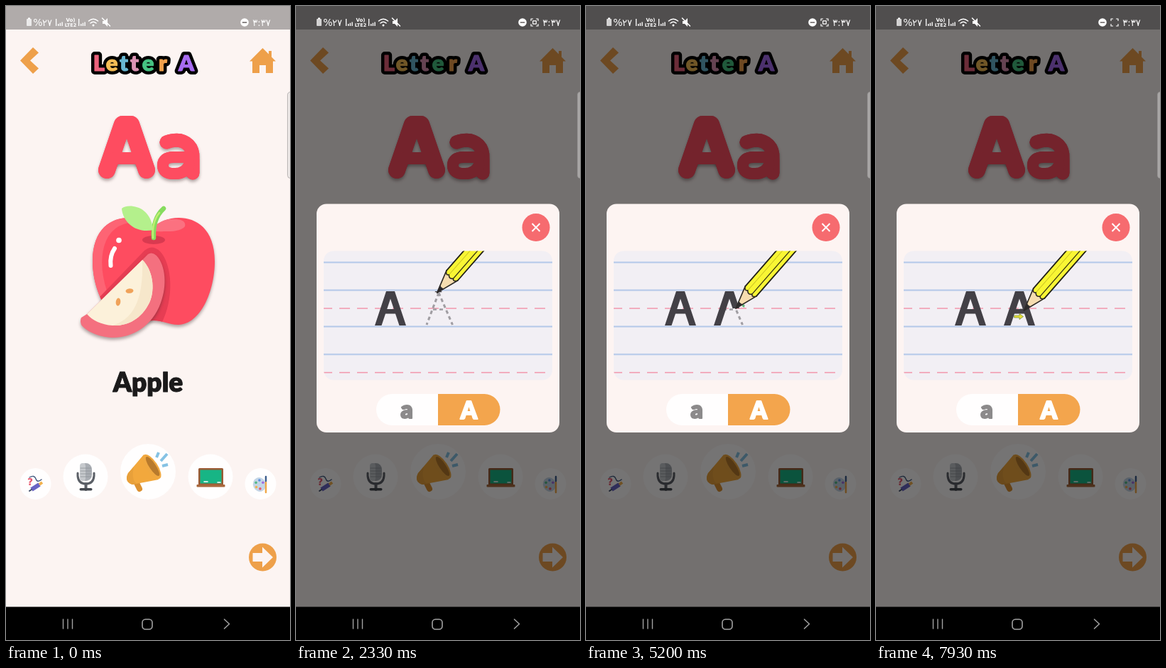
These frames come from a looping animation (400 px wide and 889 px high, 8 s). An HTML page with a canvas:

```html
<!DOCTYPE html>
<html lang="en">
<head>
<meta charset="utf-8">
<title>Letter A</title>
<style>
html, body { margin: 0; width: 100%; height: 100%; overflow: hidden; background: #000; }
canvas { position: absolute; left: 0; top: 0; width: 100vw; height: 100vh; }
</style>
</head>
<body>
<canvas id="stage"></canvas>
<script>
const W = 400, H = 889, LOOP = 8000;
const ORANGE = '#eea04a', RED = '#fe4c60', PAGE = '#fcf4f2', INK = '#434046';
const scale = Math.max(1, window.devicePixelRatio || 1);

function setup(canvas) {
  canvas.width = W * scale;
  canvas.height = H * scale;
  const ctx = canvas.getContext('2d');
  ctx.scale(scale, scale);
  ctx.lineJoin = ctx.lineCap = 'round';
  return ctx;
}
const main = setup(document.getElementById('stage'));
const layer = setup(document.createElement('canvas'));
let g = main;

const clamp = v => Math.max(0, Math.min(1, v));
const span = (t, a, b) => clamp((t - a) / (b - a));

function rect(x, y, w, h, color, r = 0) {
  g.fillStyle = color;
  g.beginPath();
  g.roundRect(x, y, w, h, r);
  g.fill();
}
function oval(x, y, rx, ry, color, turn = 0) {
  g.fillStyle = color;
  g.beginPath();
  g.ellipse(x, y, rx, ry, turn, 0, Math.PI * 2);
  g.fill();
}
const disc = (x, y, r, color) => oval(x, y, r, r, color);

function fill(d, color) {
  g.fillStyle = color;
  g.fill(new Path2D(d));
}
function line(d, color, width, cap = 'round') {
  g.strokeStyle = color;
  g.lineWidth = width;
  g.lineCap = cap;
  g.stroke(new Path2D(d));
  g.lineCap = 'round';
}
function text(s, x, y, size, color, font = '"DejaVu Sans", sans-serif') {
  g.font = size + 'px ' + font;
  g.textAlign = 'center';
  g.fillStyle = color;
  g.fillText(s, x, y);
}
// Heavy lettering, rounded by its own outline
function fat(s, x, y, size, color, width) {
  text(s, x, y, '900 ' + size, color, 'Lato, "Open Sans", sans-serif');
  g.strokeStyle = color;
  g.lineWidth = width;
  g.strokeText(s, x, y);
}
function shadowed(draw) {
  g.save();
  g.shadowColor = 'rgba(60,40,40,.4)';
  g.shadowBlur = 4 * scale;
  g.shadowOffsetY = 3 * scale;
  draw();
  g.restore();
}

function title() {
  const chars = [['L', 131, '#ea627c'], ['e', 149, '#f5bd55'], ['t', 166, '#68b7d2'], ['t', 181, '#dc93b4'],
    ['e', 200, '#46c382'], ['r', 221, '#f0a04c'], ['A', 254, '#a76cf0']];
  for (const [c, x] of chars) fat(c, x, 91, 31, '#000', 10);
  for (const [c, x, color] of chars) fat(c, x, 91, 31, color, 1);
}

function header() {
  fill('M38 58L46 65.500L34 76.500L46 87.500L38 95L20 76.500Z', ORANGE);
  fill('M361.500 59L380 77.500H376V94H366V83H357V94H347V77.500H343Z', ORANGE);
  rect(370, 63, 4, 9, ORANGE);
  title();
}

// The rounded display letters, built from thick strokes
function bigLetters() {
  line('M142 230L164 166H176L198 230', RED, 24);
  line('M152 213.500H188', RED, 17);
  line('M226 191Q246 184 257 195Q264 202 263 215V234', RED, 19);
  line('M258 212H236Q221 212 221 223.500Q221 235 236 235Q252 236 258 223', RED, 16);
}

function apple() {
  const body = 'M208 310C226 290 294 284 294 358C294 400 274 446 243 447C228 447 222 441 208 441C194 441 186 447 172 447C146 445 122 400 122 358C122 284 190 290 208 310Z';
  const slice = 'M106 437L114 432L192 356L200 348Q206 344 212 350C225 364 227 392 218 416C206 450 176 466 149 465C130 464 113 456 106 447Q104 441 106 437Z';
  shadowed(() => fill(body, RED));
  g.save();
  g.clip(new Path2D(body));
  line('M172 296C120 306 118 372 142 420', '#fd6474', 16);
  fill('M186 299H240Q254 300 252 309Q246 317 222 316Q196 318 186 299Z', '#fb7180');
  fill('M130 410L192 346Q204 332 217 344C234 362 238 410 218 447H130Z', '#e63d53');
  g.restore();
  oval(208, 328, 16, 6, '#d93a50');
  line('M208 325C207 308 211 294 222 284', '#86dc5e', 6.5);
  line('M207 325C206 310 209 298 216 290', '#c2ee72', 2.5);
  fill('M163 284C170 277 204 278 207 314C186 319 165 306 163 284Z', '#b4f08c');
  disc(159, 328.500, 3.800, '#fff');
  line('M153 340Q146 350 147.500 364', '#fff', 6);
  shadowed(() => fill(slice, '#f4707f'));
  fill('M114 432L192 356C206 369 211 396 202 416C190 440 170 449 150 448C134 447 122 441 114 432Z', '#fcf1da');
  fill('M192 356C206 369 211 396 202 416C190 440 170 449 150 448C176 440 194 418 192 356Z', '#f6e7cb');
  oval(158, 415, 3.300, 5.500, '#f0a259', 0.1);
  oval(174, 399.500, 5.500, 3.300, '#f0a259', -0.1);
}

function mic() {
  line('M101 655V659Q102 670 112.500 670Q123 670 124 659V655', '#5b5f66', 3);
  line('M112.500 670V678', '#5b5f66', 4);
  rect(103.500, 676, 18, 3.500, '#44484f', 2);
  rect(104, 641, 17, 25, '#a9adb3', 8.500);
  rect(104, 641, 8, 25, '#c6c9cd', 8);
  for (let y = 648; y < 663; y += 4) line(`M105 ${y}H120`, '#8f9398', 0.8);
}

function megaphone() {
  line('M183 667L188 677', '#dc9130', 8);
  fill('M194 629L172 655Q166 667 178 671L215 664Z', '#f2a83d');
  fill('M172 655Q166 667 178 671L184 670Q176 664 180 646Z', '#e8a03a');
  oval(205.500, 646, 20, 8, '#f0a840', 0.98);
  oval(206.500, 645.500, 16, 4.5, '#b87a2c', 0.98);
  line('M212 633L215 626M218 638L227 628M220 645L228 643', '#85c2e4', 4, 'butt');
}

function board() {
  rect(271, 648, 35, 24, '#9a5a34', 1.5);
  rect(273.5, 650.5, 30, 19, '#17b585');
  rect(268.5, 671, 40, 3.5, '#a9683c', 1);
  line('M279 667H284M298 668H302', '#fff', 1.5);
}

function tools() {
  text('?', 34, 672, 'bold 14', '#e8566d');
  line('M33 661Q40 657 42 663T50 664', '#435a80', 1.4);
  line('M36 678L47 671', '#6a64c4', 6, 'butt');
  line('M47 671L51 668', '#f2b24e', 4, 'butt');
  line('M33 680L36 678', '#3b4a66', 2);
}

function palette() {
  oval(357, 671, 9, 10, '#c3d5e6', -0.4);
  const dots = ['#e8566d', '#f2b24e', '#52b788', '#5a8fe0', '#a06be0'];
  dots.forEach((c, i) => disc(357 + 5.5 * Math.cos(i * 1.1 + 1.4), 671 + 6 * Math.sin(i * 1.1 + 1.4), 1.8, c));
  line('M366 682V668', '#f0a94a', 2.5);
  line('M366 666V660', '#3f5f8f', 2.5);
}

function page() {
  rect(0, 0, W, H, PAGE);
  rect(0, 0, W, 33, '#b0abaa');
  header();
  shadowed(bigLetters);
  bigLetters();
  apple();
  fat('Apple', 200, 541, 37, '#1b1a1b', 1);
  for (const [x, y, r] of [[41.5, 670, 22], [112, 660, 31.5], [200, 653, 39], [288, 660, 31.5], [358.5, 670, 22]])
    disc(x, y, r, '#fffefe');
  tools();
  mic();
  megaphone();
  board();
  palette();
  disc(361.5, 773, 19.5, ORANGE);
  fill('M347.500 767H361V758.500L376 773L361 787.500V779H347.500Z', PAGE);
}

function statusBar(t) {
  const c = '#fff';
  rect(29, 18, 7, 10, 'rgba(255,255,255,.75)', 1);
  rect(31, 16.5, 3, 2, c);
  text('%', 45, 28, 14, c);
  text('٢٧', 58, 28, 13, c);
  for (const x of [70, 102]) {
    rect(x, 18, 1.3, 10, c);
    for (let i = 0; i < 3; i++) rect(x + 3 + i * 2.7, 25 - i * 1.3, 1.4, 3 + i * 1.3, c);
  }
  text('Vo)', 91, 22, 'bold 7', c);
  text('LTE2', 91, 29, 'bold 6.5', c);
  line('M116.500 21Q123 15.500 129.500 21M119 24Q123 20.500 127 24', c, 1.6);
  disc(123, 27, 1.5, c);
  fill('M136 21H139L143 17V29L139 25H136Z', c);
  line('M135.500 17L146.500 28', c, 1.5);

  const shift = 17 * span(t, 70, 330);
  disc(336 - shift, 23, 5.8, c);
  rect(332.8 - shift, 22.2, 6.4, 1.8, '#807c7b');
  if (t >= 200) {
    line('M331 20.500V18H333.500M338.500 18H341V20.500M341 25.500V28H338.500M333.500 28H331V25.500', c, 1.2);
    if (t < 530 || Math.floor((t - 530) / 500) % 2) {
      g.strokeStyle = c;
      g.strokeRect(333.7, 20.8, 4.6, 4.4);
    }
  }
  text('٣:٣٧', 360, 28, 13, c);
}

function navBar() {
  rect(0, 842.5, W, 47, '#000');
  line('M80.500 860V873M87 860V873M93.500 860V873', '#a2a2a2', 1.4);
  g.strokeStyle = '#a2a2a2';
  g.lineWidth = 1.6;
  g.beginPath();
  g.roundRect(192, 860, 14, 14, 4.5);
  g.stroke();
  line('M307.500 860L314.500 866.500L307.500 873', '#a2a2a2', 1.5);
}

// One leg of the letter A, drawn from the top down to share k
function leg(x, side, k) {
  if (k <= 0) return;
  const s = side * 16 * k, y = 400 + 48 * k;
  fill(`M${x} 400H${x + 9.5}L${x + 9.5 + s} ${y}H${x + s}Z`, INK);
}
function letter(x, left, right, bar) {
  leg(x + 16, -1, left);
  leg(x + 18.5, 1, right);
  if (bar > 0) rect(x + 10, 425, 24 * bar, 6.5, INK);
}

function arrow(x, y, angle, size, color) {
  const shape = 'M-6 -1.500H1V-4L6.500 0L1 4V1.500H-6Z';
  g.save();
  g.translate(x, y);
  g.rotate(angle);
  g.scale(size, size);
  fill(shape, color);
  line(shape, '#6f8a30', 0.7);
  g.restore();
}

function pencil(x, y) {
  g.save();
  g.translate(x, y);
  g.rotate(-0.85);
  fill('M0 0L32 10.500V-10.500Z', '#f6ddb0');
  fill('M32 10.500H240V-10.500H32Q26 -7 30 -4Q25 0 30 4Q26 7 32 10.500Z', '#f9f634');
  line('M30 -4H240', '#cfc826', 1);
  line('M30 4H240', '#3a3716', 1.3);
  line('M0 0L32 10.500Q26 7 30 4Q25 0 30 -4Q26 -7 32 -10.500L0 0', '#2e2a24', 1.6);
  line('M32 10.500H240M32 -10.500H240', '#222018', 1.8);
  fill('M-1 0L11 4Q9 0 11 -4Z', '#2d2a2c');
  g.restore();
}

// Pencil tip: time, x, y
const KEYS = [[0, 224, 400], [1300, 224, 400], [2100, 199, 401], [2300, 199, 401], [3600, 184, 447],
  [3700, 184, 447], [4400, 201, 401], [4550, 201, 401], [5850, 221, 447], [5950, 221, 447],
  [6350, 195, 428], [6450, 195, 428], [8000, 209, 427]];

function tipAt(t) {
  const i = KEYS.findIndex(k => k[0] > t);
  const [t0, x0, y0] = KEYS[i - 1], [t1, x1, y1] = KEYS[i];
  const k = (t - t0) / (t1 - t0);
  return [x0 + (x1 - x0) * k, y0 + (y1 - y0) * k];
}

function paper(t) {
  const [x, y] = tipAt(t);
  g.save();
  g.beginPath();
  g.roundRect(39, 343.5, 322, 181, 14);
  g.clip();
  rect(39, 343, 322, 182, '#f2eff4');
  for (const ly of [359.5, 398.5, 449.5, 488.5]) line(`M39 ${ly}H361`, '#b4c8e9', 2);
  g.setLineDash([15, 10]);
  g.lineDashOffset = 3;
  for (const ly of [424, 514]) line(`M39 ${ly}H361`, '#f2adbe', 2, 'butt');
  g.setLineDash([]);
  g.lineDashOffset = 0;

  letter(111, 1, 1, 1);
  if (t < 1300) {
    letter(180, 1, 1, 1);
  } else {
    const left = span(t, 2300, 3600), right = span(t, 4550, 5850);
    const bar = t < 6400 ? 0 : clamp((x - 189) / 20);
    g.setLineDash([5, 4]);
    if (left < 1) line('M201 402L184 447', '#a09da2', 3, 'butt');
    if (right < 1) line('M201 402L220.500 447', '#a09da2', 3, 'butt');
    if (bar < 1) line('M193 425.500H210', '#a09da2', 2.5, 'butt');
    g.setLineDash([]);
    letter(180, left, right, bar);
    if (t > 2450 && t < 4450) arrow(181.5, 419, 2.05, 0.95, '#c9d13a');
    if (t > 4600 && t < 6550) arrow(221.3, 419.5, 1.1, 0.5, '#3cc48a');
    if (t > 6600) arrow(201, 435.5, 0, 1, '#e6dc3a');
  }
  pencil(x, y);
  g.restore();
}

function dialog(t) {
  g.clearRect(0, 0, W, H);
  rect(29, 277.5, 342, 320.5, '#fdf4f2', 14);
  disc(338, 310.5, 19.5, '#f66b6f');
  line('M332.500 305L343.500 316M343.500 305L332.500 316', '#fff', 2, 'butt');
  paper(t);
  rect(113, 544, 174.5, 44, '#fffefe', 22);
  rect(200, 544, 87.5, 44, '#f3a54d', [0, 22, 22, 0]);
  fat('a', 156, 578, 33, '#8c8a8b', 2);
  fat('A', 243.5, 578.5, 33, '#fff', 2);
}

function draw(t) {
  const shown = span(t, 830, 1030);
  g = main;
  page();
  if (shown) {
    rect(0, 0, W, H, `rgba(0,0,0,${0.54 * shown})`);
    g = layer;
    dialog(t);
    g = main;
    g.globalAlpha = shown;
    g.drawImage(layer.canvas, 0, 0, W, H);
    g.globalAlpha = 1;
  }
  rect(396.5, 120.5, 10, 121, 'rgba(222,219,219,.5)', 4);
  g.strokeStyle = 'rgba(150,147,147,.6)';
  g.lineWidth = 1;
  g.stroke();
  statusBar(t);
  navBar();
}

const start = performance.now();
function tick() {
  draw((performance.now() - start) % LOOP);
  requestAnimationFrame(tick);
}
tick();
</script>
</body>
</html>
```
